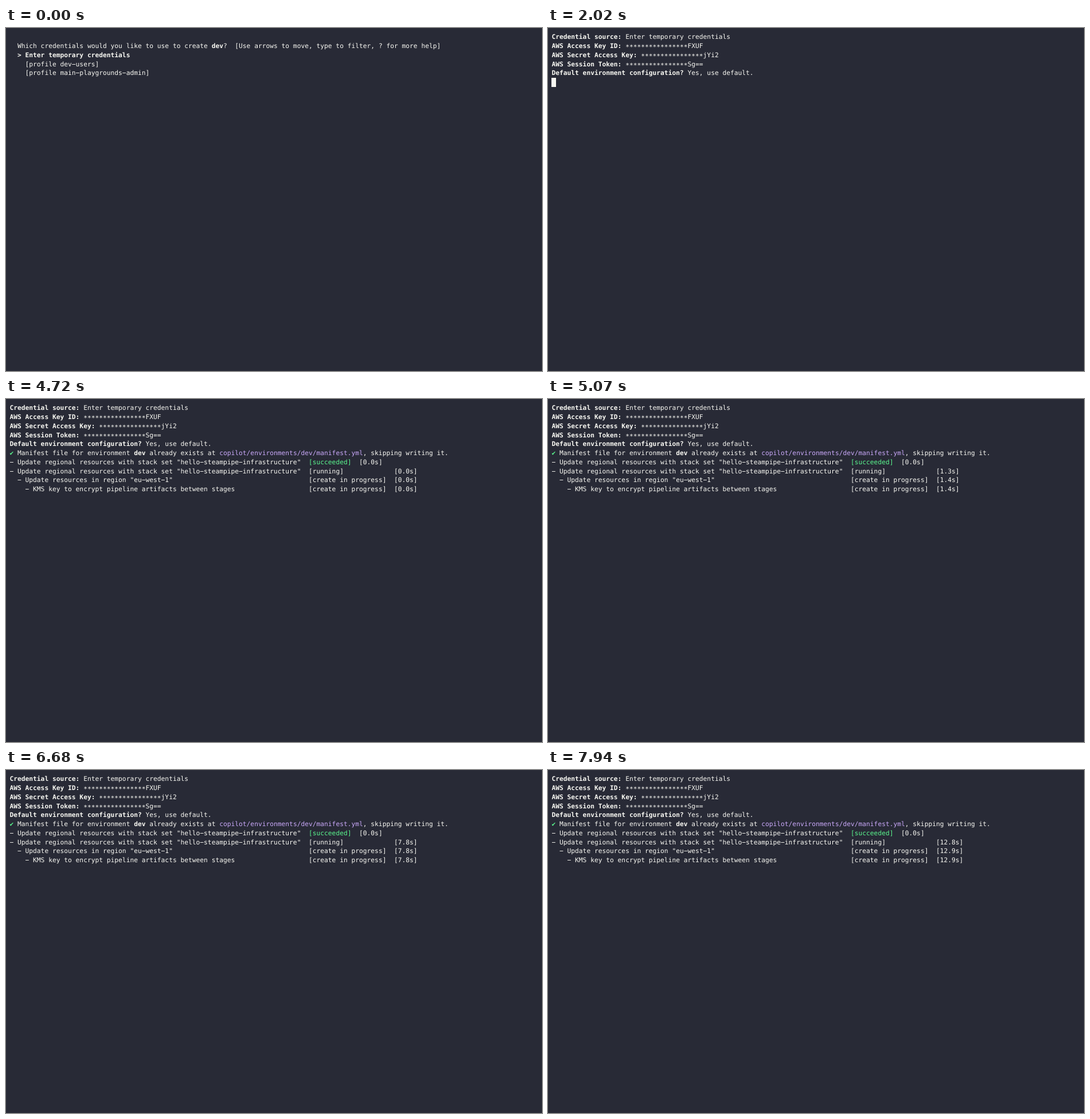
Animation, 935 px wide and 599 px high, one loop 7.99 s. Source, as an HTML page:

```html
<!DOCTYPE html>
<html lang="en">
<head>
<meta charset="utf-8">
<title>Terminal session</title>
<style>
  html, body { margin: 0; width: 100%; height: 100%; overflow: hidden; background: #282a36; }
  svg { display: block; }
  text {
    font: 11.25px "DejaVu Sans Mono", monospace;
    fill: #f8f8f2;
    white-space: pre;
    text-rendering: geometricPrecision;
  }
  .b { font-weight: bold; }
  .g { fill: #5af78e; }
  .p { fill: #caa9fa; }
  rect { fill: #f8f8f2; }
</style>
</head>
<body>
<svg id="screen" width="935" height="599" viewBox="0 0 935 599"></svg>
<script>
const NS = "http://www.w3.org/2000/svg";
const LOOP = 7990;
const LEFT = 6.45, TOP = 8.2, BASE = 19.4, CELL = 6.773, ROW = 15.75;
const screen = document.getElementById("screen");

// Inline styles are written {b|bold}, {g|green}, {p|purple}.
const stars = "*".repeat(16);
const keys = ["Access Key ID", "Secret Access Key", "Session Token"];
const masks = ["FXUF", "jYi2", "Sg=="].map(end => stars + end);

const chooser = [
  "",
  "  Which credentials would you like to use to create {b|dev}?  [Use arrows to move, type to filter, ? for more help]",
  "  {b|> Enter temporary credentials}",
  "    [profile dev-users]",
  "    [profile main-playgrounds-admin]"
];

const answers = [
  "{b|Credential source:} Enter temporary credentials",
  ...keys.map((key, i) => `{b|AWS ${key}:} ${masks[i]}`)
];

const defaults = [
  ...answers,
  "",
  "  Would you like to use the default configuration for a new environment?",
  "    - A new VPC with 2 AZs, 2 public subnets and 2 private subnets",
  "    - A new ECS Cluster",
  "    - New IAM Roles to manage services and jobs in your environment",
  "  [Use arrows to move, type to filter]",
  "  {b|> Yes, use default.}",
  "    Yes, but I'd like configure the default resources (CIDR ranges, AZs).",
  "    No, I'd like to import existing resources (VPC, subnets)."
];

const configured = [...answers, "{b|Default environment configuration?} Yes, use default."];

const manifest = [
  ...configured,
  "{g|✔} Manifest file for environment {b|dev} already exists at " +
  "{p|copilot/environments/dev/manifest.yml}, skipping writing it."
];

const update = '- Update regional resources with stack set "hello-steampipe-infrastructure"  ';
const updated = [...manifest, update + "{g|[succeeded]}  [0.0s]"];

function keyPrompt(i) {
  const line = `  What's your AWS ${keys[i]}? (${masks[i]}) `;
  return {
    lines: [...answers.slice(0, i + 1), "", line],
    cursor: [line.length, i + 2]
  };
}

function progress(t) {
  const since = t - 4720;
  const step = 32 * Math.floor(since / 1610) + Math.min(31, Math.floor(since % 1610 / 50));
  const secs = Math.max(0, 0.2018 * step - 0.08);
  const line = (name, status, s) =>
    name.padEnd(77) + status.padEnd(22) + `[${s.toFixed(1)}s]`;
  return {
    lines: [
      ...updated,
      line(update, "[running]", secs),
      line('  - Update resources in region "eu-west-1"', "[create in progress]", secs + 0.04),
      line("    - KMS key to encrypt pipeline artifacts between stages", "[create in progress]", secs + 0.04)
    ]
  };
}

function stateAt(t) {
  if (t < 340) return { lines: chooser };
  if (t < 540) return keyPrompt(0);
  if (t < 630) return keyPrompt(1);
  if (t < 770) return keyPrompt(2);
  if (t < 2020) return { lines: defaults };
  if (t < 2190) return { lines: configured, cursor: [0, 5] };
  if (t < 3440) return { lines: manifest, cursor: [0, 6] };
  if (t < 4720) return { lines: updated, cursor: [0, 7] };
  return progress(t);
}

function add(tag, attrs, content = "") {
  const el = document.createElementNS(NS, tag);
  for (const name in attrs) el.setAttribute(name, attrs[name]);
  el.textContent = content;
  screen.appendChild(el);
}

function drawLine(line, row) {
  let col = 0;
  for (const part of line.match(/\{\w\|[^}]*\}|\*+|[^{*]+/g) || []) {
    const styled = part[0] === "{";
    const str = styled ? part.slice(3, -1) : part;
    const indent = str.length - str.trimStart().length;
    const drop = part[0] === "*" ? 2 : 0; // centre asterisks on the line
    add("text", {
      x: LEFT + (col + indent) * CELL,
      y: Math.round(BASE + row * ROW) + drop,
      class: styled ? part[1] : "n"
    }, str.trim().replaceAll("-", "\u2212")); // wide terminal dash
    col += str.length;
  }
}

function drawCursor([col, row]) {
  const y = Math.round(TOP + row * ROW);
  const end = Math.round(TOP + (row + 1) * ROW);
  add("rect", { x: Math.round(LEFT + col * CELL), y, width: 8, height: end - y });
}

let shown = "";

function render(t) {
  const state = stateAt(t);
  const key = JSON.stringify(state);
  if (key === shown) return;
  shown = key;
  screen.replaceChildren();
  state.lines.forEach(drawLine);
  if (state.cursor) drawCursor(state.cursor);
}

const start = performance.now();
function tick() {
  render((performance.now() - start) % LOOP);
  requestAnimationFrame(tick);
}
tick();
</script>
</body>
</html>
```
